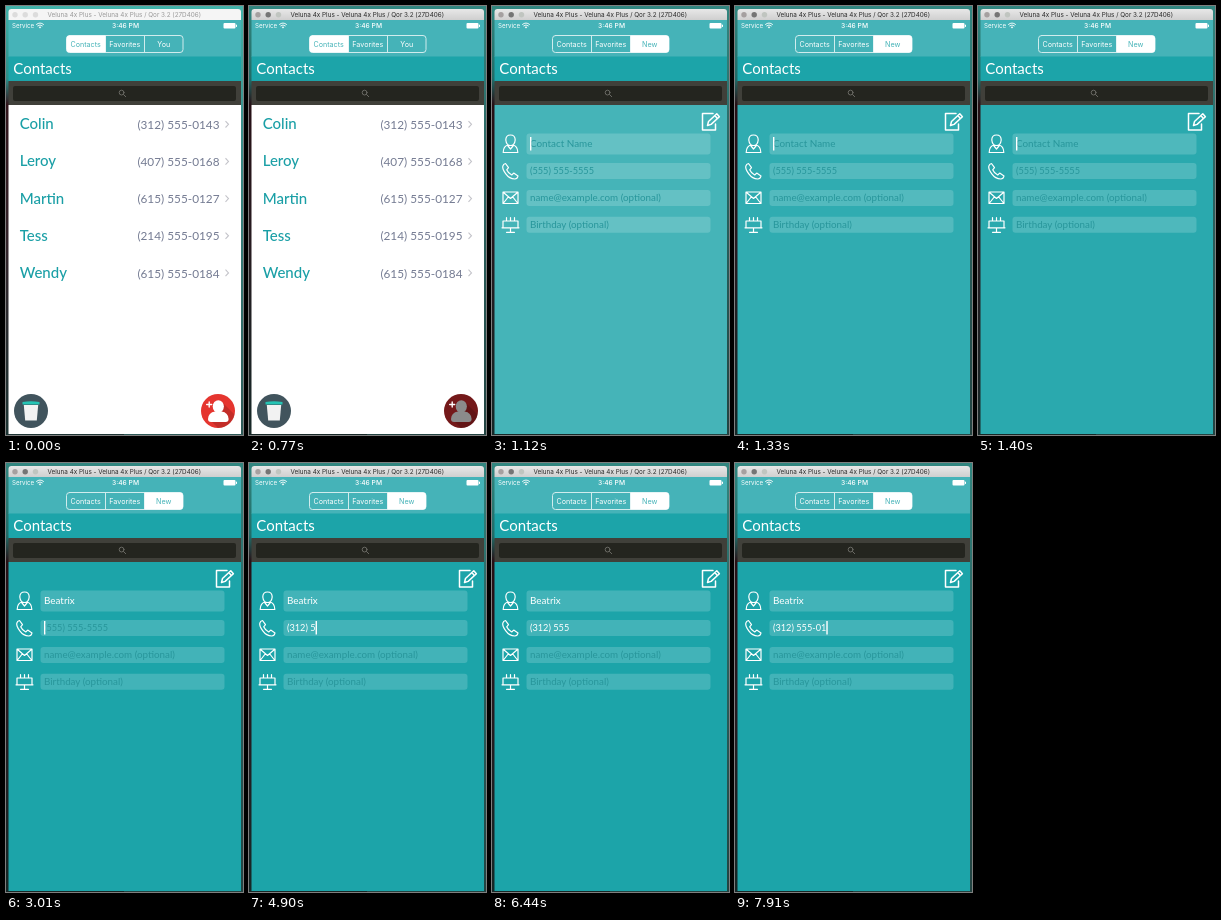
An HTML page that plays this animation: 237 px wide and 429 px high, repeating every 8000 ms.

```html
<!DOCTYPE html>
<html lang="en">
<head>
<meta charset="utf-8">
<title>Contacts</title>
<style>
  html, body { margin: 0; width: 100%; height: 100%; overflow: hidden; }
  svg { display: block; width: 100vw; height: 100vh; }
  text { font-family: Lato, sans-serif; white-space: pre; }
  .ui { font-family: Inter, sans-serif; }
  .mid { text-anchor: middle; }
  .line { fill: none; stroke: #fff; stroke-width: 1.2; stroke-linecap: round; stroke-linejoin: round; }
  .hint { fill: #28969b; }
</style>
</head>
<body>
<svg viewBox="0 0 237 429" xmlns="http://www.w3.org/2000/svg">
  <defs>
    <linearGradient id="desk" x2="0" y2="1">
      <stop offset="0" stop-color="#42b3aa"/>
      <stop offset=".17" stop-color="#2c8f89"/>
      <stop offset=".23" stop-color="#32151c"/>
      <stop offset=".55" stop-color="#33232a"/>
      <stop offset="1" stop-color="#1d3534"/>
    </linearGradient>
    <linearGradient id="deskRight" x2="0" y2="1">
      <stop offset="0" stop-color="#42b3aa"/>
      <stop offset=".3" stop-color="#3a8d89"/>
      <stop offset="1" stop-color="#2d5957"/>
    </linearGradient>
    <linearGradient id="bar" x2="0" y2="1">
      <stop offset="0" stop-color="#e8e8e8"/>
      <stop offset="1" stop-color="#cfcfcf"/>
    </linearGradient>
    <clipPath id="addClip"><circle cx="212" cy="405" r="17"/></clipPath>
  </defs>

  <rect width="237" height="429" fill="url(#desk)"/>
  <rect x="118" width="119" height="429" fill="url(#deskRight)"/>
  <rect id="shade" width="237" height="429" opacity=".25"/>
  <path id="titleBar" d="M2.500 14V6q0-3 3-3H232q3 0 3 3V14z"/>
  <g id="lights"><circle cx="9" cy="8.800" r="2.700"/><circle cx="19.200" cy="8.800" r="2.700"/><circle cx="29.500" cy="8.800" r="2.700"/></g>
  <text id="title" class="ui mid" x="118.300" y="11.200" font-size="6.350">Veluna 4x Plus - Veluna 4x Plus / Qor 3.2 (27D406)</text>

  <!-- status bar and header -->
  <rect x="2.500" y="14" width="232.500" height="37" fill="#45b3b8"/>
  <g fill="#fff">
    <text class="ui" x="6" y="22" font-size="6.200">Service</text>
    <text class="ui mid" x="119.500" y="22.200" font-size="6.700" font-weight="500">3:46 PM</text>
    <path d="M34 22.600l-1.300-1.600q1.300-1 2.600 0z"/>
    <path class="line" style="stroke-width:.9" d="M31.700 19.800q2.300-1.900 4.600 0M30.500 18.400q3.500-2.900 7 0"/>
    <rect x="217.500" y="17" width="12" height="5.600" rx="1"/>
    <rect x="230" y="18.700" width="1" height="2.200"/>
  </g>
  <path id="picked" fill="#fff"/>
  <g class="line" style="stroke-width:1" opacity=".75">
    <rect x="60.500" y="29.500" width="116.500" height="17" rx="3"/>
    <path d="M99.500 30V46M138.500 30V46"/>
  </g>
  <g font-size="7.200" fill="#fff">
    <text id="tab0" class="ui mid" x="79.600" y="40.600">Contacts</text>
    <text class="ui mid" x="118.800" y="40.600">Favorites</text>
    <text id="tab2" class="ui mid" x="157.800" y="40.600"></text>
  </g>
  <rect x="2.500" y="50.500" width="232.500" height="25" fill="#1ca4a9"/>
  <text x="7.300" y="67.500" font-size="15" fill="#fff">Contacts</text>
  <rect x="2.500" y="75" width="232.500" height="24" fill="#40403a"/>
  <rect x="7" y="80" width="223" height="15" rx="2" fill="#24251f"/>
  <g class="line" style="stroke:#6a6a64;stroke-width:1"><circle cx="115.600" cy="86.600" r="2.400"/><path d="M117.500 88.500l2.200 2.200"/></g>

  <rect id="body" x="2.500" y="99" width="232.500" height="329"/>

  <g id="list">
    <g id="rows"></g>
    <circle cx="25" cy="405" r="17" fill="#41545d"/>
    <path d="M16.500 396q8.500-1.500 17 0v2.600h-17z" fill="#25c4b4"/>
    <path d="M17.800 399h14.400l-1.400 15.500h-11.600z" fill="#f2f2f2"/>
    <circle id="add" cx="212" cy="405" r="17"/>
    <path d="M217 397l14 14v14h-16l-9-9z" clip-path="url(#addClip)" opacity=".15"/>
    <g id="person"><ellipse cx="212.300" cy="400.500" rx="5.600" ry="6.300"/><path d="M205 416q-3 0-3-3 .3-6.500 7-7.500h6.600q6.700 1 7 7.500 0 3-3 3z"/></g>
    <path class="line" style="stroke-width:1.400" d="M200.700 398.500h5M203.200 396v5"/>
  </g>

  <g id="form">
    <g class="line">
      <g style="stroke-width:1.500">
        <path d="M221 107.500H210.500V124H223.500V118"/>
        <path d="M215.500 119.500l1-4 8.300-7.700 2.600 2.900-8.300 7.700zM222.800 109.600l2.600 2.900"/>
      </g>
      <path d="M13.800 134q0-5 4.700-5t4.700 5q-.6 5.500-4.700 5.500t-4.700-5.500zM16 139q-4.600 1-4.800 7.500h14.600q-.2-6.500-4.800-7.500M16 140l2.500 3 2.500-3"/>
      <path d="M13.500 157.500l3 4.200-1.800 2.100q1.500 3.500 5 5.200l2-1.900 4.300 2.800q-.6 3-3.200 3.100-5.500-.3-9-5.200-3.600-4.600-3-7.700.6-2.200 2.700-2.600z"/>
      <path d="M11 186h15v11.500H11zM11.500 186.500l7 6 7-6M11.500 197l4.700-6M25.500 197l-4.700-6"/>
      <path d="M11 221.500v-6.500h15v6.500M10 221.800h17M18.500 222v4.200M14.500 226.300h8M14.500 214.500v-3M18.500 214.500v-3M22.500 214.500v-3"/>
    </g>
    <g id="fields"></g>
    <rect id="cursor" width="1.400" height="13.500" fill="#fff"/>
  </g>
</svg>

<script>
const LOOP = 8000, STEP = 70;
const PRESS = 770, OPEN = 1120, NEXT_FIELD = 3010;
const $ = id => document.getElementById(id);
const set = (id, attrs) => {
  for (const key in attrs) $(id).setAttribute(key, attrs[key]);
};
const show = (id, on) => set(id, { display: on ? 'inline' : 'none' });

const people = [
  ['Colin', '(312) 555-0143'],
  ['Leroy', '(407) 555-0168'],
  ['Martin', '(615) 555-0127'],
  ['Tess', '(214) 555-0195'],
  ['Wendy', '(615) 555-0184']
];
$('rows').innerHTML = people.map(([name, phone], i) => {
  const y = 118.3 + i * 37.15;
  return `<text x="13.7" y="${y + 5}" font-size="15" font-weight="500" fill="#1a9fa6">${name}</text>
    <text x="213.5" y="${y + 4.6}" font-size="11.8" fill="#747b92" text-anchor="end">${phone}</text>
    <path d="M219.5 ${y - 3.2}l3 3.2-3 3.2" fill="none" stroke="#c4c4ca" stroke-width="1.1"/>`;
}).join('');

// top, height, font size, placeholder
const fields = [
  [127.5, 21, 9.9, 'Contact Name'],
  [157, 16, 9.2, '(555) 555-5555'],
  [184, 16, 9.8, 'name@example.com (optional)'],
  [210.7, 16, 9.8, 'Birthday (optional)']
];
$('fields').innerHTML = fields.map(([y, h, size, hint], i) =>
  `<rect x="34.5" y="${y}" width="184" height="${h}" rx="3" fill="#fff" opacity=".17"/>
   <text id="field${i}" class="hint" x="38" y="${y + h / 2 + 3.3}" font-size="${size}">${hint}</text>`
).join('');

// [time, content] for each keystroke
const typing = [
  [[2030, 'B'], [2240, 'Be'], [2380, 'Bea'], [2520, 'Beat'], [2590, 'Beatr'], [2730, 'Beatrix']],
  [[4060, '3'], [4200, '31'], [4340, '312'], [4900, '(312) 5'], [5460, '(312) 55'],
   [5740, '(312) 555'], [7280, '(312) 555-0'], [7840, '(312) 555-01']]
];

// [start, steps, final opacity] of each cursor fade
const blinks = [[1750, 3, 0], [2030, 1, 1], [3570, 4, 0], [4060, 1, 1], [6300, 3, 0], [6790, 3, 1]];

function cursorOpacity(t) {
  let value = 1;
  for (const [start, steps, goal] of blinks) {
    if (t < start) break;
    const done = Math.min(1, (Math.floor((t - start) / STEP) + 1) / steps);
    value += (goal - value) * done;
  }
  return value;
}

function drawField(i, t) {
  const key = typing[i].filter(k => t >= k[0]).pop();
  const field = $('field' + i);
  field.textContent = key ? key[1] : fields[i][3];
  field.style.fill = key ? '#fff' : '';
  return key ? 38 + field.getComputedTextLength() : 38;
}

function drawForm(t) {
  const ends = [drawField(0, t), drawField(1, t)];
  const active = t < NEXT_FIELD ? 0 : 1;
  set('cursor', {
    x: ends[active],
    y: active ? 158 : 131,
    opacity: cursorOpacity(t)
  });
}

function draw(t) {
  const focused = t >= PRESS, open = t >= OPEN;

  show('shade', focused);
  set('titleBar', { fill: focused ? 'url(#bar)' : '#f5f5f5' });
  set('title', { fill: focused ? '#2a2a2a' : '#999' });
  const tones = focused ? ['#a5a0a0', '#757575', '#c0c5c0'] : ['#dcdcdc', '#dcdcdc', '#dcdcdc'];
  [...$('lights').children].forEach((c, i) => c.setAttribute('fill', tones[i]));

  set('picked', {
    d: open ? 'M138.5 29.5H174q3 0 3 3V43.5q0 3-3 3H138.5z'
            : 'M99.5 29.5H63.5q-3 0-3 3V43.5q0 3 3 3H99.5z'
  });
  set('tab0', { fill: open ? '#fff' : '#45b3b8' });
  set('tab2', { fill: open ? '#45b3b8' : '#fff' });
  $('tab2').textContent = open ? 'New' : 'You';

  set('add', { fill: focused ? '#74191a' : '#e5352f' });
  set('person', { fill: focused ? '#8b8b8b' : '#fff' });
  show('list', !open);
  show('form', open);

  // the new page settles from a pale to a full teal
  const pale = open ? 0.18 * Math.max(0, 1 - Math.floor((t - OPEN) / STEP) / 6) : 1;
  const tint = [28, 164, 169].map(c => Math.round(c + (255 - c) * pale));
  set('body', { fill: `rgb(${tint})` });
  if (open) drawForm(t);
}

const begin = performance.now();
function tick() {
  draw((performance.now() - begin) % LOOP);
  requestAnimationFrame(tick);
}
tick();
</script>
</body>
</html>
```
